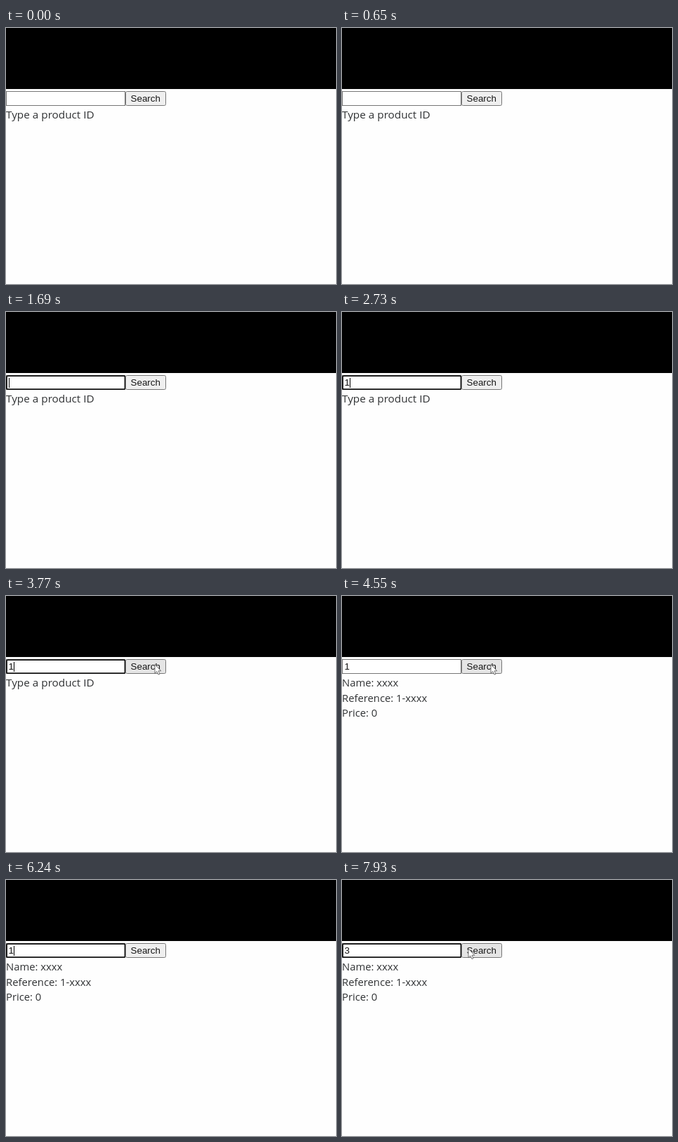
Animation, 470 px wide and 365 px high, one loop 8000 ms. Source, as an HTML page:

```html
<!DOCTYPE html>
<html lang="en">
<head>
<meta charset="utf-8">
<title>Product search</title>
<style>
  html, body { margin: 0; width: 100%; height: 100%; overflow: hidden; background: #fefefe; }
  svg { display: block; }
  .ui { font: 13.333px "Liberation Sans", Arial, sans-serif; fill: #161616; }
  .page { font: 14.8px "Open Sans", "Noto Sans", sans-serif; fill: #303234; }
  .box { stroke: #767676; }
</style>
</head>
<body>
<svg width="470" height="365" viewBox="0 0 470 365">
  <rect width="470" height="365" fill="#fefefe"/>
  <rect width="470" height="87"/>
  <rect class="box" x=".5" y="90.5" width="169" height="20" fill="#fff"/>
  <rect id="focus" x="1" y="91.2" width="168.5" height="19" rx="1.5" fill="#fff" stroke="#101010" stroke-width="1.8"/>
  <text id="value" class="ui" x="3.5" y="105"></text>
  <rect id="caret" y="94" width="1" height="14"/>
  <rect id="button" class="box" x="170.5" y="90.5" width="57" height="20" rx="2"/>
  <text class="ui" x="177.6" y="105">Search</text>
  <text id="hint" class="page" y="129" style="font-size:15.3px">Type a product ID</text>
  <g id="result" class="page">
    <text y="129">Name: xxxx</text>
    <text y="150.5">Reference: 1-xxxx</text>
    <text y="172">Price: 0</text>
  </g>
  <path id="pointer" d="M0 0V12.5L2.8 10 5 14.6 7 13.7 5 9.3H8.8Z" fill="#fff" stroke="#666" stroke-width=".9"/>
</svg>
<script>
const LOOP = 8000, STEP = 130;
const $ = id => document.getElementById(id);
const show = (id, on) => $(id).setAttribute("visibility", on ? "visible" : "hidden");
const within = (t, spans) => spans.some(([a, b]) => t >= a && t < b);

// Pointer passes over the button: [start, end, x from, x to, y]
const moves = [
  [3510, 3770, 177, 212, 97.5],
  [3770, 5200, 212, 212, 97.5],
  [5200, 5460, 200, 168, 97.5],
  [7800, 7930, 172, 180, 98],
  [7930, LOOP, 180, 180, 98]
];

function draw(t) {
  const value = t < 2730 ? "" : t < 6890 ? "1" : t < 7020 ? "" : "3";
  $("value").textContent = value;
  $("caret").setAttribute("x", value ? 11 : 4);
  show("caret", within(t, [[1690, 2210], [2730, 3250], [3770, 3900], [5850, 6760], [6890, 7670]]));
  show("focus", within(t, [[1690, 3900], [5850, LOOP]]));

  show("hint", t < 4550);
  show("result", t >= 4550);

  const move = moves.find(([a, b]) => t >= a && t < b);
  show("pointer", move);
  $("button").setAttribute("fill", move ? "#e5e5e5" : "#efefef");
  if (move) {
    const [a, b, x0, x1, y] = move;
    const x = x0 + (x1 - x0) * (t - a) / (b - a);
    $("pointer").setAttribute("transform", `translate(${x} ${y})`);
  }
}

function tick() {
  const t = performance.now() % LOOP;
  draw(Math.floor(t / STEP) * STEP);
  requestAnimationFrame(tick);
}
tick();
</script>
</body>
</html>
```
